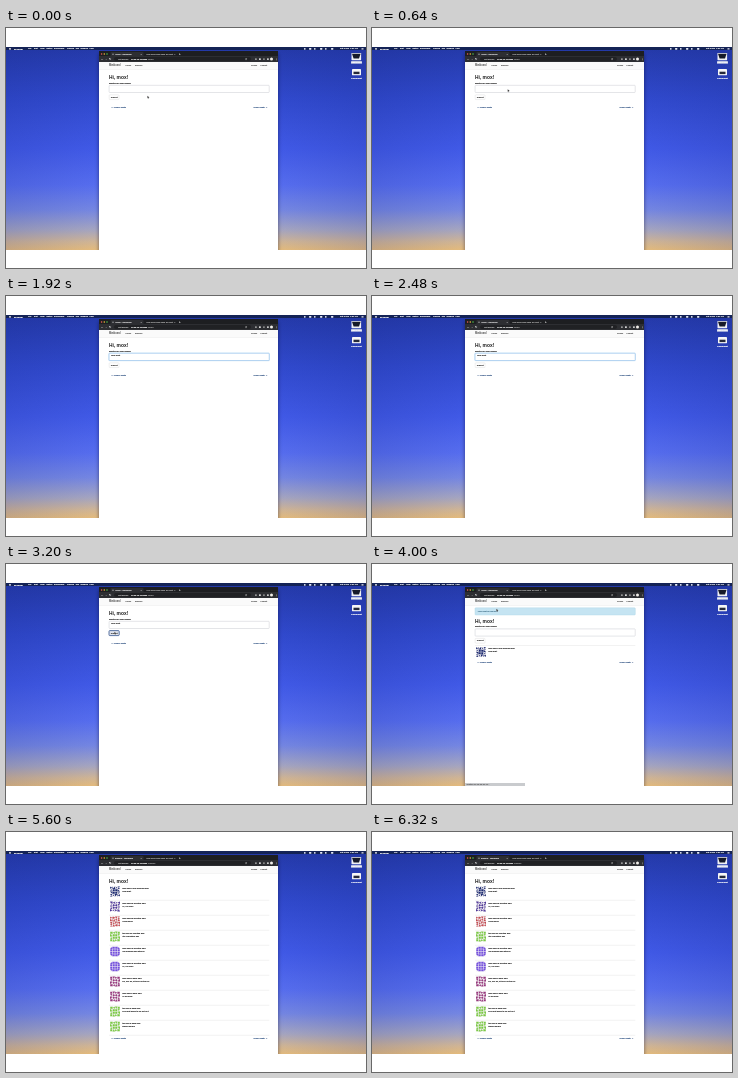
Animation, 360 px wide and 240 px high, one loop 6400 ms. Source, as an HTML page with a canvas:

```html
<!DOCTYPE html>
<html lang="en">
<head>
<meta charset="utf-8">
<style>
html, body { margin: 0; width: 100%; height: 100%; overflow: hidden; background: #fff; }
canvas { display: block; width: 360px; height: 240px; }
</style>
</head>
<body>
<canvas id="stage"></canvas>
<script>
const LOOP = 6400;
const canvas = document.getElementById('stage');
const g = canvas.getContext('2d');
const dpr = window.devicePixelRatio || 1;
canvas.width = 360 * dpr;
canvas.height = 240 * dpr;
g.scale(dpr, dpr);

function rect(x, y, w, h, fill) {
  g.fillStyle = fill;
  g.fillRect(x, y, w, h);
}

function box(x, y, w, h, r, fill, stroke, lineWidth = 0.5) {
  g.beginPath();
  g.roundRect(x, y, w, h, r);
  if (fill) { g.fillStyle = fill; g.fill(); }
  if (stroke) { g.strokeStyle = stroke; g.lineWidth = lineWidth; g.stroke(); }
}

function dot(x, y, r, fill) {
  g.beginPath();
  g.arc(x, y, r, 0, 7);
  g.fillStyle = fill;
  g.fill();
}

// Tiny text gets a thin outline so that it stays legible.
function text(str, x, y, size = 2.2, color = '#333', weight = 400, align = 'left') {
  g.font = `${weight} ${size}px "Liberation Sans", Arial, sans-serif`;
  g.textBaseline = 'middle';
  g.textAlign = align;
  g.fillStyle = g.strokeStyle = color;
  g.lineWidth = 0.12;
  g.fillText(str, x, y);
  if (size < 3) g.strokeText(str, x, y);
}

function polygon(points, fill) {
  g.beginPath();
  points.forEach(([x, y]) => g.lineTo(x, y));
  g.closePath();
  g.fillStyle = fill;
  g.fill();
}

function gradient(x1, y1, x2, y2, stops) {
  const result = g.createLinearGradient(x1, y1, x2, y2);
  stops.forEach(([p, c]) => result.addColorStop(p, c));
  return result;
}

function desktop() {
  rect(0, 0, 360, 240, '#fff');
  rect(0, 19, 360, 203, gradient(0, 19, 0, 222, [[0, '#2439a8'], [0.25, '#3049cc'],
    [0.5, '#4059e6'], [0.68, '#566dee'], [0.8, '#7486e2'], [0.9, '#a5a5c0'],
    [0.96, '#d0b595'], [1, '#e4bb7c']]));
  const edge = 'rgba(20,35,130,.14)', clear = 'rgba(20,35,130,0)';
  rect(0, 19, 360, 203, gradient(0, 0, 360, 0, [[0, edge], [0.25, clear], [0.75, clear], [1, edge]]));
  rect(0, 19, 360, 3, '#142356');
  dot(4, 20.8, 0.9, '#fff');
  text('Browser', 8, 20.9, 2.2, '#fff', 700);
  [['File', 22], ['Edit', 28], ['View', 34], ['History', 40], ['Bookmarks', 48],
   ['Profiles', 61], ['Tab', 69.5], ['Window', 74.5], ['Help', 83.5]]
    .forEach(([s, x]) => text(s, x, 20.9, 2.1, '#fff'));
  [298, 303, 308, 314, 319, 325].forEach((x, i) => box(x, 20, i % 2 ? 2.4 : 1.6, 1.7, 0.6, '#e4e9f8'));
  text('Sat 6 Mar  1:24 PM', 334, 20.9, 2.1, '#fff');
  rect(355.5, 20.2, 2, 1.3, '#dde');

  box(345.5, 25, 9.6, 7.2, 0.4, '#f0f1f5');
  polygon([[346, 25.8], [354.6, 25.8], [353, 30.6], [347.6, 30.6]], '#161a29');
  box(345, 33, 11, 2.8, 0.6, '#c0c7e2');
  text('Recording', 350.5, 34.4, 2, '#fff', 700, 'center');
  box(346, 41, 9, 6.2, 0.4, '#f6f6f6');
  rect(347.5, 43.7, 6, 2.4, '#25293a');
  text('Screenshot', 350.5, 50.3, 2, '#fff', 700, 'center');
}

function browser(title, path) {
  g.save();
  g.beginPath();
  g.rect(0, 22, 360, 200);
  g.clip();
  g.shadowColor = 'rgba(0,0,30,.5)';
  g.shadowBlur = 4 * dpr;
  g.shadowOffsetY = 3 * dpr;
  rect(93, 23, 179, 202, '#fff');
  g.restore();
  rect(93, 23, 179, 5, '#1d1e21');
  ['#f35f57', '#f5bd3c', '#4fc54b'].forEach((c, i) => dot(95.6 + i * 2.7, 26, 0.8, c));
  box(104.5, 24, 33, 4, [1, 1, 0, 0], '#2d2e32');
  dot(107, 26.2, 0.7, '#a9abb0');
  text(title, 109, 26.3, 2.1, '#e3e3e3');
  text('×', 134.5, 26.2, 2.5, '#ddd');
  text('How small web apps are built', 140, 26.3, 2.1, '#aaa');
  text('×', 168, 26.2, 2.5, '#bbb');
  text('+', 173, 26.2, 2.6, '#ccc');
  rect(93, 28, 179, 6, '#2d2e32');
  text('←', 95, 31.1, 2.8, '#ddd');
  text('→', 99, 31.1, 2.8, '#888');
  text('↻', 103, 31.1, 2.8, '#ddd');
  box(108, 29, 137, 4, 2, '#202124');
  text('Not Secure', 112, 31.1, 2.1, '#bbb');
  text('10.20.30.40:8080', 125, 31.1, 2.1, '#f2f2f2');
  text(path, 142, 31.1, 2.1, '#999');
  text('☆', 239, 31, 2.5, '#ccc');
  [['#999', 249], ['#ddd', 253], ['#888', 257], ['#ccc', 261]]
    .forEach(([c, x]) => box(x, 30.2, 1.8, 1.8, 0.5, c));
  dot(265.5, 31, 1.5, '#f1eee9');
  text('⋮', 269, 31, 2.6, '#ddd');
}

function navbar() {
  rect(93, 34, 179, 7, '#fafafa');
  rect(93, 41, 179, 0.4, '#e4e4e4');
  text('Miniboard', 103, 37.5, 2.6, '#666');
  [['Home', 119.5], ['Explore', 129], ['Profile', 245], ['Logout', 254.5]]
    .forEach(([s, x]) => text(s, x, 37.5, 2.2, '#555'));
}

function pager(y) {
  text('← Newer posts', 105, y, 2.2, '#2c4f80');
  text('Older posts →', 261.5, y, 2.2, '#2c4f80', 400, 'right');
}

// Identicon patches within a unit cell.
const patches = {
  corner: [[0, 1], [1, 0], [1, 1]],
  wedge: [[0, 0], [1, 0], [0.5, 1]],
  bow: [[0, 0], [1, 1], [1, 0], [0, 1]],
  block: [[0.1, 0.1], [0.9, 0.1], [0.9, 0.9], [0.1, 0.9]],
  diamond: [[0.5, 0], [1, 0.5], [0.5, 1], [0, 0.5]],
  arrow: [[0, 0], [1, 0.5], [0, 1], [0.5, 0.5]],
};

// A quarter of the pattern, turned four times about the centre.
function avatar(x, y, color, quarter) {
  rect(x, y, 10, 10, '#f3f1f3');
  const cells = [[0, 0], [1, 0], [2, 0], [1, 1]];
  for (let turn = 0; turn < 4; turn++) {
    g.save();
    g.translate(x + 5, y + 5);
    g.rotate(turn * Math.PI / 2);
    g.scale(2.5, 2.5);
    quarter.split(' ').forEach((name, i) => {
      const [cx, cy] = cells[i];
      polygon(patches[name].map(([a, b]) => [a + cx - 2, b + cy - 2]), color);
    });
    g.restore();
  }
}

function post(y, [color, quarter], heading, body) {
  avatar(104, y, color, quarter);
  text(heading, 116.3, y + 1.8, 2.1, '#222');
  text(body, 116.3, y + 4.8, 2.1, '#222');
}

const navy = ['#1d2b70', 'bow corner arrow block'];
const purple = ['#4c3596', 'wedge bow arrow diamond'];
const red = ['#c24a50', 'bow diamond wedge bow'];
const green = ['#7ac943', 'block bow wedge block'];
const violet = ['#7550dd', 'corner block block block'];
const plum = ['#96387c', 'block wedge bow diamond'];

const recent = [navy, 'mox said a few seconds ago:', 'New post'];
const posts = [
  recent,
  [purple, 'mox said 26 minutes ago:', "Hi, I'm mox!"],
  [red, 'mox said 28 minutes ago:', 'Hello world'],
  [green, 'tilo said 31 minutes ago:', "It's a beautiful day"],
  [violet, 'mox said 35 minutes ago:', "I'm learning web stuff lol"],
  [violet, 'mox said 36 minutes ago:', "Hi, I'm mox!"],
  [plum, 'mox said 2 days ago:', "So, hey all, let's go up the hill"],
  [plum, 'mox said 2 days ago:', 'Hi all folks!'],
  [green, 'tilo said 2 days ago:', 'The best place to go out of it'],
  [green, 'tilo said 2 days ago:', 'Makes sense!'],
];

const heading = y => text('Hi, mox!', 103, y, 4.9, '#222', 700);

function home(t) {
  const posted = t >= 3450;
  const dy = posted ? 7.6 : 0;
  const focused = t >= 800 && t < 3000;
  const pressed = t >= 3000 && !posted;
  if (posted) {
    box(103, 43.8, 160.3, 7.2, 0.8, '#c5e4f2', '#a9d3e6', 0.4);
    text('Your post is now live!', 105.5, 47.4, 2.2, '#4a7890');
  }
  heading(49.8 + dy);
  text("What's on your mind?", 103, 55 + dy, 2.1, '#222', 700);
  if (focused) box(102.9, 57.1, 160.5, 7.6, 1, null, 'rgba(102,175,233,.25)', 1.2);
  box(103.1, 57.3 + dy, 160.1, 7.2, 0.6, '#fff', focused ? '#7fb2e4' : '#c8cbd0', 0.5);
  const count = posted ? 0 : Math.max(0, Math.min(8, Math.floor((t - 1040) / 105)));
  text('New post'.slice(0, count), 105, 59.5, 2.2, '#222');
  if (pressed) box(103, 66.6, 10.2, 5, 0.8, '#dfe3ec', '#34558f', 0.8);
  else box(103.2, 66.8 + dy, 9.8, 4.8, 0.8, '#fff', '#d8d8d8', 0.4);
  text('Submit', 108.1, 69.2 + dy, 2.2, '#333', 400, 'center');
  if (posted) {
    rect(103, 81.3, 160.3, 0.4, '#ddd');
    post(83, ...recent);
  }
  pager(posted ? 98.7 : 79.3);
}

function explore() {
  heading(49.8);
  posts.forEach((p, i) => {
    const y = 54.5 + i * 15;
    post(y, ...p);
    rect(103, y + 13.4, 160.3, 0.4, '#ddd');
  });
  pager(206);
}

const path = [[0, 142, 69], [350, 142, 69], [750, 135, 61], [2560, 135, 61],
  [3000, 109, 69], [3450, 109, 69], [4000, 125, 46], [4450, 132.5, 38.5], [LOOP, 132.5, 38.5]];

function cursor(t) {
  if ((t > 1040 && t < 2560) || t > 5600) return;
  const i = path.findIndex(p => p[0] > t);
  const [t0, x0, y0] = path[i - 1], [t1, x1, y1] = path[i];
  const k = (t - t0) / (t1 - t0), e = k * k * (3 - 2 * k);
  const x = x0 + (x1 - x0) * e - 0.6, y = y0 + (y1 - y0) * e - 1.2;
  const arrow = [[0, 0], [0, 2.6], [0.65, 2], [1.1, 3], [1.6, 2.8], [1.15, 1.85], [2, 1.8]];
  polygon(arrow.map(([a, b]) => [x + a, y + b]), '#111');
  g.strokeStyle = '#fff';
  g.lineWidth = 0.2;
  g.stroke();
}

function statusBar(message, fill, color) {
  rect(93, 219, 60, 3, fill);
  text(message, 94.5, 220.5, 2.1, color);
}

function draw(t) {
  const exploring = t >= 4640;
  desktop();
  browser(exploring ? 'Explore - Miniboard' : 'Home - Miniboard', exploring ? '/explore' : '/index');
  navbar();
  if (exploring) explore(); else home(t);
  if (t >= 3600 && t < 4400) statusBar('Waiting for 10.20.30.40...', '#c9cbce', '#666');
  else if (t >= 4400 && t < 5600) statusBar('10.20.30.40:8080/explore', '#333437', '#ccc');
  cursor(t);
}

function frame() {
  draw(performance.now() % LOOP);
  requestAnimationFrame(frame);
}
frame();
</script>
</body>
</html>
```
